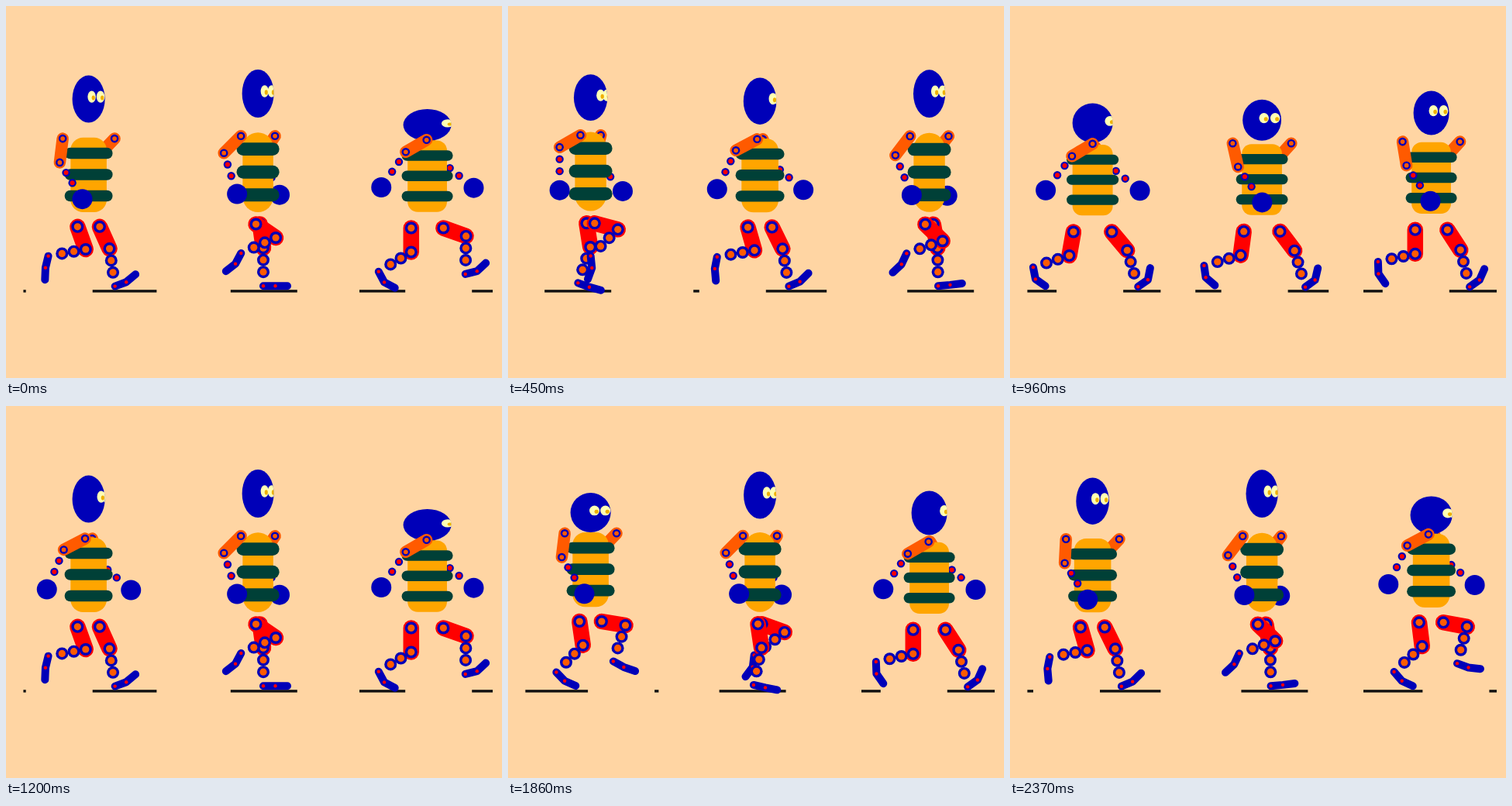
An HTML page with a canvas for the animation above (2400 ms loop, 640 by 480 pixels).

```html
<!DOCTYPE html>
<html lang="en">
<head>
<meta charset="utf-8">
<title>Three walkers</title>
<style>
html, body { margin: 0; height: 100%; overflow: hidden; background: #ffd5a3; }
canvas { display: block; }
</style>
</head>
<body>
<canvas id="stage" width="640" height="480"></canvas>
<script>
const ctx = document.getElementById('stage').getContext('2d');
const BLUE = '#0000b8', RED = '#ff0000', ORANGE = '#ff5a00', GREEN = '#004037';
const LOOP = 2400, TICK = 30, STEP = 1200, LEAD = 270;
const UNIT = 15.5, RAD = Math.PI / 180;

// Key times within one step; a leg passes through them twice (stance, then swing).
const KEYS = [.025, .1, .2, .4, .45, .55, .775, .9];
const BODY = {
  hipY: [291.5, 288.8, 285.5, 281.7, 281.5, 281.3, 278, 286.5],
  headY: [151, 138, 122.7, 113.2, 113, 115, 137.5, 153.5],
  headR: [26, 23, 21.3, 20.6, 20.5, 21, 26, 31]
};
// Angles in degrees from straight down, positive forward.
const LEG = {
  thigh: [40, 33, 26, 10, 8, 8.5, 8.3, 0, -10, 0, 16, 46, 55.6, 70, 80.7, 70.4],
  shin: [16.6, 14, 9.5, 1, 0, -12, -44.6, -59, -72, -78, -80, -71, -66, -53, -18.6, -1],
  heel: [125, 125, 113, 95, 90, 77, 44, 28, 11, 2, -11, -25, -28, -7, 61, 104],
  toe: [169, 156, 135, 97, 90, 79, 66, 62, 55, 35, 5, -47, -52, -37, 71, 133]
};
// Arm angles as [mean, linear, quadratic] in the cosine of the cycle.
const NEAR_ARM = { side: -1, upper: [-51.5, 36.5, 29], lower: [12.5, 36, -14.3] };
const FAR_ARM = { side: 1, upper: [-29, -39, 26], lower: [31, -35.5, -16] };

const mod = (a, n) => ((a % n) + n) % n;

// Periodic cubic through the values at KEYS.
function spline(values, x) {
  const n = values.length, period = n / KEYS.length;
  const time = i => KEYS[mod(i, KEYS.length)] + Math.floor(i / KEYS.length);
  const value = i => values[mod(i, n)];
  const rise = i => (value(i + 1) - value(i)) / (time(i + 1) - time(i));
  const slope = i => {
    const before = time(i) - time(i - 1), after = time(i + 1) - time(i);
    return (rise(i - 1) * after + rise(i) * before) / (before + after);
  };
  x = mod(x, period);
  let i = -1;
  while (time(i + 1) <= x) i++;
  const h = time(i + 1) - time(i), u = (x - time(i)) / h, w = 1 - u;
  return value(i) * w * w * (1 + 2 * u) + value(i + 1) * u * u * (3 - 2 * u)
    + h * u * w * (slope(i) * w - slope(i + 1) * u);
}

const move = ([x, y], angle, length) =>
  [x + Math.sin(angle * RAD) * length, y + Math.cos(angle * RAD) * length];

function ellipse(x, y, rx, ry, color) {
  ctx.beginPath();
  ctx.ellipse(x, y, rx, ry, 0, 0, 2 * Math.PI);
  ctx.fillStyle = color;
  ctx.fill();
}
const dot = ([x, y], r, color) => ellipse(x, y, r, r, color);

function ring(p, outer, inner, color) {
  dot(p, outer, BLUE);
  dot(p, inner, color);
}

function limb(points, width, color) {
  ctx.beginPath();
  points.forEach(p => ctx.lineTo(...p));
  ctx.lineWidth = width;
  ctx.lineCap = ctx.lineJoin = 'round';
  ctx.strokeStyle = color;
  ctx.stroke();
}

function bar(x, y, halfWidth, height, radius, color) {
  ctx.beginPath();
  ctx.roundRect(x - halfWidth, y, 2 * halfWidth, height, radius);
  ctx.fillStyle = color;
  ctx.fill();
}

function drawLeg(cx, hipY, phase) {
  const p = mod(phase, 2);
  const hip = [cx + 52 * Math.abs(p - 1) - 26, hipY];
  const shin = spline(LEG.shin, p);
  const knee = move(hip, spline(LEG.thigh, p), 2 * UNIT);
  const ankle = move(knee, shin, 49);
  const ball = move(ankle, spline(LEG.heel, p), UNIT);
  const tip = move(ball, spline(LEG.toe, p), UNIT);
  limb([hip, knee], 20.5, RED);
  for (const joint of [hip, knee, move(knee, shin, UNIT), move(knee, shin, 2 * UNIT)])
    ring(joint, 8, 4.6, ORANGE);
  limb([ankle, ball, tip], 10, BLUE);
  dot(ankle, 2.2, RED);
  dot(ball, 2.2, RED);
}

function drawArm(cx, hipY, swing, arm) {
  const angle = ([a, b, c]) => a + b * swing + c * swing * swing;
  const lower = angle(arm.lower);
  const shoulder = [cx + arm.side * 19 * (1 + swing), hipY - 113.7];
  const elbow = move(shoulder, angle(arm.upper), 2 * UNIT);
  limb([shoulder, elbow], 15.5, ORANGE);
  ring(shoulder, 5.3, 2.9, ORANGE);
  ring(elbow, 5.3, 2.9, ORANGE);
  ring(move(elbow, lower, UNIT), 5.2, 3, RED);
  ring(move(elbow, lower, 2 * UNIT), 5.2, 3, RED);
  dot(move(elbow, lower, 55.5), 13, BLUE);
}

function drawHead(cx, phase, swing) {
  const rx = spline(BODY.headR, phase);
  ctx.save();
  ctx.translate(cx, spline(BODY.headY, phase));
  ctx.scale(rx, 51.5 - rx);
  ellipse(0, 0, 1, 1, BLUE);
  ctx.clip();
  for (const x of [.9 - .22 * swing, .48 - .38 * swing]) {
    ellipse(x, -.1, .25, .25, '#ffffb4');
    ellipse(x + .1, -.05, .1, .1, '#f0b000');
  }
  ctx.restore();
}

function drawTorso(cx, hipY, phase) {
  const wave = Math.cos(2 * Math.PI * phase);
  const half = 22.8 + 3.2 * wave, height = 15 - 2 * wave;
  bar(cx, hipY - 115.5 + 3 * wave, half, 97.2 - 6 * wave, Math.min(half, 17 - 5 * wave), '#ffa500');
  for (const row of [-1, 0, 1]) {
    const y = hipY - 67.3 + row * (27.8 - 1.9 * wave);
    bar(cx, y - height / 2, 30.5 + 3.1 * wave, height, height / 2, GREEN);
  }
}

function drawGround(left, phase) {
  const width = 172;
  const start = left + mod(128 - width * phase, width);
  ctx.fillStyle = '#101010';
  for (const x of [start - width, start]) {
    const from = Math.max(x, left), to = Math.min(x + width / 2, left + width);
    if (to > from) ctx.fillRect(from, 366.2, to - from, 3.4);
  }
}

function drawWalker(index, phase) {
  const cx = 106.6 + 218.5 * index;
  const hipY = spline(BODY.hipY, phase);
  const swing = Math.cos(Math.PI * phase);
  drawGround(22.4 + 216.8 * index, phase);
  drawArm(cx, hipY, swing, FAR_ARM);
  drawLeg(cx, hipY, phase);
  drawHead(cx, phase, swing);
  drawTorso(cx, hipY, phase);
  drawLeg(cx, hipY, phase + 1);
  drawArm(cx, hipY, swing, NEAR_ARM);
}

function draw(now) {
  const t = Math.floor((now % LOOP) / TICK + .01) * TICK;
  ctx.fillStyle = '#ffd5a3';
  ctx.fillRect(0, 0, 640, 480);
  // Each walker goes twice as fast as the one before.
  for (let i = 0; i < 3; i++) drawWalker(i, 2 ** i * (t + LEAD) / STEP);
  requestAnimationFrame(draw);
}
draw(performance.now());
</script>
</body>
</html>
```
